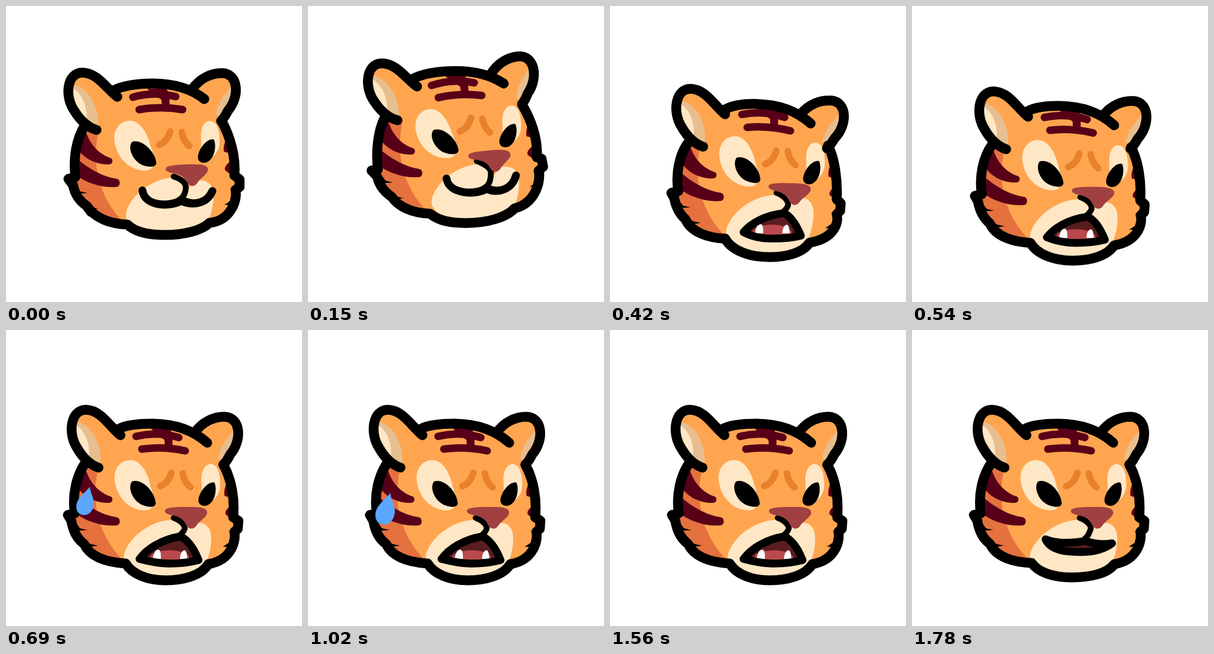
These frames come from a looping animation (512x512 px, 1.81 s). An HTML page without scripts:

```html
<!DOCTYPE html>
<html lang="en">
<head>
<meta charset="utf-8">
<title>Tiger</title>
<style>
html, body { margin: 0; width: 100%; height: 100%; overflow: hidden; background: #fff; }
svg { display: block; width: 100vw; height: 100vh; }

/* Poses: a = rest, p = wind-up, c = dropping, d = low, f = mouth shut; the drawing itself is the settled pose. */
.m { animation: pose 1810ms linear infinite; }
.morph { animation: morph 1810ms linear infinite; }
#head { animation: dip 1810ms linear infinite; }

@keyframes pose {
  0% { translate: var(--a); rotate: var(--ra, 0deg); animation-timing-function: ease-in-out; }
  10.77% { translate: var(--p); rotate: var(--rp, 0deg); animation-timing-function: cubic-bezier(.4,0,.75,.75); }
  16.57% { translate: var(--c); rotate: var(--rc, 0deg); animation-timing-function: cubic-bezier(.3,.4,.65,.9); }
  23.2% { translate: var(--d); rotate: var(--rd, 0deg); animation-timing-function: ease-in-out; }
  37.57%, 100% { translate: 0px 0px; rotate: 0deg; }
}
@keyframes morph {
  0% { d: var(--a); animation-timing-function: ease-in-out; }
  10.77% { d: var(--p); animation-timing-function: cubic-bezier(.4,0,.75,.75); }
  16.57% { d: var(--c); animation-timing-function: cubic-bezier(.3,.4,.65,.9); }
  23.2% { d: var(--d); animation-timing-function: ease-in-out; }
  37.57%, 93.37% { d: var(--e); }
  98.34%, 100% { d: var(--f); }
}
@keyframes dip {
  0%, 23.2% { translate: 0px 0px; animation-timing-function: ease-out; }
  25.97% { translate: 3px 9px; animation-timing-function: ease-in-out; }
  37.57%, 100% { translate: 0px 0px; }
}
@keyframes bite {
  0%, 10.77% { translate: 4px -62px; scale: 1 0; }
  16.57% { translate: 3px -40px; scale: 1 .25; }
  23.2% { translate: -3px -3px; scale: 1 1; }
  37.57%, 93.37% { translate: 0px 0px; scale: 1 1; }
  98.34%, 100% { translate: 3px -18px; scale: 1 0; }
}
@keyframes sweat {
  0%, 32.6% { transform: translate(6px,-16px) rotate(0deg) scale(0,0); animation-timing-function: ease-out; }
  38.12% { transform: translate(0px,0px) rotate(0deg) scale(1,1); }
  59.67% { transform: translate(-4px,16px) rotate(0deg) scale(1.13,1.13); }
  72.93% { transform: translate(1.5px,39px) rotate(-18deg) scale(.65,.78); }
  86.19%, 100% { transform: translate(4px,57px) rotate(-25deg) scale(0,0); }
}

.skin { fill: #ffa550; }
.cream { fill: #ffe7c5; }
.tan { fill: #e7be8f; }
.dark { fill: #580018; }
.line { fill: none; stroke: #000; stroke-width: 17; stroke-linecap: round; stroke-linejoin: round; }

.outline {
  --a: path("M186 146 C202 138 228 134 252 134 C288 134 318 141 343 161 M373 199 C387 224 398 260 395 293 L404 300 L404 313 L397 318 C401 336 388 372 352 375 C338 389 306 396 275 396 C245 396 222 390 210 378 C182 377 154 368 140 346 C128 338 119 326 116 310 L108 299 L120 296 C116 262 122 230 136 207");
  --p: path("M178 125 C198 114 228 110 256 110 C290 110 316 117 338 131 M370 167 C385 193 398 224 396 258 L404 260 L407 274 L399 281 C404 300 393 338 358 347 C345 362 313 373 273 373 C245 373 226 369 211 357 C187 356 161 350 145 328 C132 319 123 307 120 293 L110 283 L121 281 C117 247 122 212 132 192");
  --c: path("M186 154 C202 145 228 141 252 141 C288 141 318 148 341 167 M372 203 C386 226 397 262 395 300 L404 302 L404 316 L397 322 C400 340 388 374 352 380 C338 394 306 402 275 402 C245 402 222 396 210 382 C182 382 154 374 140 352 C128 344 119 334 116 318 L108 307 L120 304 C116 270 122 236 135 215");
  --d: path("M200 178 C212 172 228 169 248 169 C288 169 322 180 347 203 M377 241 C388 262 394 300 392 334 L399 341 L398 354 L392 360 C396 374 388 402 345 409 C334 426 306 434 276 434 C240 434 210 422 199 402 C172 401 140 392 130 368 C120 360 113 345 111 332 L106 323 L118 320 C113 290 120 255 136 235");
  --e: path("M195 171 C209 164 230 162 252 162 C290 162 322 172 348 195 M376 233 C390 258 396 292 393 324 L402 330 L401 344 L395 349 C398 362 392 398 350 405 C338 425 306 433 276 433 C244 433 218 422 207 404 C178 402 146 394 135 370 C124 362 116 348 113 330 L107 320 L119 317 C114 285 122 252 137 230");
  --f: path("M195 171 C209 164 230 162 252 162 C290 162 322 172 348 195 M376 233 C390 258 396 292 393 324 L402 330 L401 344 L395 349 C398 362 392 398 350 405 C338 422 306 428 276 428 C244 428 218 419 207 403 C178 402 146 394 135 370 C124 362 116 348 113 330 L107 320 L119 317 C114 285 122 252 137 230");
}
.mouth {
  --a: path("M236 319 C240 349 288 347 303 335 C325 347 348 341 357 320 C348 341 325 347 303 337 C288 347 240 349 236 319Z");
  --p: path("M240 296 C244 324 294 325 309 312 C330 323 354 314 360 290 C354 314 330 323 309 314 C294 325 244 324 240 296Z");
  --c: path("M237 352 C258 349 285 340 304 331 C316 337 333 346 346 350 C330 360 305 364 283 364 C262 364 246 360 237 352Z");
  --d: path("M231 391 C244 375 268 362 301 358 C314 364 323 380 330 397 C315 401 297 402 280 402 C262 402 244 398 231 391Z");
  --e: path("M231 396 C246 376 272 362 302 357 C316 364 326 380 333 398 C318 402 300 404 283 404 C264 404 246 400 231 396Z");
  --f: path("M231 362 C250 370 275 369 300 365 C312 369 330 372 346 369 C332 380 315 384 292 384 C268 384 240 382 231 362Z");
}
.philtrum {
  --a: path("M290 295 C303 299 311 306 311 313 C311 322 308 330 300 335");
  --p: path("M292 265 C304 270 317 276 317 286 C317 297 315 306 308 311");
  --c: path("M290 295 C303 299 311 306 312 314 C312 320 309 326 302 331");
  --d: path("M288 323 C299 327 308 334 308 344 C306 350 302 354 297 358");
  --e: path("M290 325 C301 329 310 336 309 344 C307 350 303 353 298 357");
  --f: path("M290 325 C301 329 310 336 309 344 C307 352 303 358 298 362");
}

#core { --a: -3px -28px; --p: -8px -50px; --c: -4px -22px; --d: 1px 5px; }
#earL { --a: -5px -23px; --p: -9px -41px; --c: -6px -15px; --d: 1px 5px;
  --ra: -2deg; --rp: -4deg; --rc: -3deg; transform-origin: 142px 190px; }
#earR { --a: -4px -34px; --p: -9px -65px; --c: -4px -27px; --d: 1px 12px;
  --rp: -6deg; --rd: 4deg; transform-origin: 362px 205px; }
#shade { --a: 1px -24px; --p: 5px -44px; --c: 2px -20px; --d: -3px 0px; }
#sideL { --a: 0px -25px; --p: 1px -44px; --c: 1px -21px; --d: 0px -1px; }
#sideR { --a: -1px -35px; --p: 0px -65px; --c: 0px -30px; --d: 0px 8px; }
#crown { --a: -5px -28px; --p: -11px -53px; --c: -5px -22.5px; --d: 2.5px 5px;
  --ra: -2.3deg; --rp: -5.5deg; --rc: -2.3deg; --rd: 2.3deg; transform-origin: 267px 197px; }
#brows { --a: -2px -30px; --p: -4.5px -56px; --c: -2px -27px; --d: 1.5px 3px; }
#eyeL { --a: 0px -27px; --p: -1px -50px; --c: 0px -23.5px; --d: 1px 0px;
  --ra: -2deg; --rp: -5deg; --rc: -2deg; transform-origin: 225px 270px; }
#eyeR { --a: -1px -33px; --p: -2px -63px; --c: -1px -30px; --d: 1px 4px; }
#muzzle { --a: 4px -32px; --p: 11px -58px; --c: 6px -30px; --d: -3px -2px; }
#nose { --a: 1.5px -32px; --p: 3px -59px; --c: 1.5px -32px; --d: -1px 0px;
  --ra: -1.5deg; --rp: -4.5deg; --rc: -1.5deg; --rd: 2deg; transform-origin: 312px 322px; }
#furL { --a: 0px -22.5px; --p: 7px -43px; --c: 1px -17px; --d: -2px 2px; }
#furR { --a: 3px -31px; --p: 9px -66px; --c: 3px -26px; --d: -3px 9px; }

#bite { transform-origin: 283px 397px; animation: bite 1810ms linear infinite; }
#drop { fill: #5ba6ff; transform-origin: 137px 296px; animation: sweat 1810ms linear infinite; }
</style>
</head>
<body>
<svg viewBox="0 0 512 512">
  <g id="head">
    <path class="skin outline morph"/>
    <path id="core" class="skin m" d="M200 171 L260 165 L320 173 L346 182 L378 217 V300 H140 V232Z"/>

    <path id="shade" class="m" fill="#e5713f" d="M137 234 L160 238 C148 285 152 350 207 403 C178 402 146 394 135 370 C124 362 116 348 119 317 C114 285 122 252 137 232Z"/>
    <g id="sideL" class="dark m">
      <path d="M137 238 C144 265 162 282 181 288 C186 290 185 299 178 299 C158 300 135 290 124 272Z"/>
      <path d="M124 290 C140 304 165 320 192 324 C199 326 198 338 191 338 C168 340 140 332 122 318Z"/>
    </g>
    <g id="sideR" class="dark m">
      <path d="M386 258 C380 266 376 278 378 287 L388 290Z"/>
      <path d="M388 304 C382 310 378 314 380 319 L390 327Z"/>
    </g>
    <g id="crown" class="m">
      <path class="dark" d="M250 170 L283 171 L288 180 V204 L275 202 L274 190 L265 184Z"/>
      <path d="M225 184 Q262 175 299 186 M235 206 Q272 201 310 209" fill="none" stroke="#580018" stroke-width="13" stroke-linecap="round"/>
    </g>
    <path id="brows" class="m" d="M286 247 Q281 265 267 270 M306 248 Q308 263 319 272" fill="none" stroke="#e9802a" stroke-width="11.5" stroke-linecap="round"/>

    <g id="eyeL" class="m">
      <path class="cream" d="M215 225 C195 225 184 245 189 266 C194 292 215 312 240 312 C262 312 256 285 250 270 C245 245 232 225 215 225Z"/>
      <path d="M218 262 C235 256 258 280 259 300 C258 308 245 307 234 302 C218 294 210 272 218 262Z"/>
    </g>
    <g id="eyeR" class="m">
      <path class="cream" d="M354 232 C368 232 372 255 370 275 C365 295 350 302 340 296 C336 288 340 275 338 260 C338 245 343 232 354 232Z"/>
      <path d="M361 265 C365 275 362 294 352 301 C344 307 334 304 333 296 C332 285 345 265 356 264 C359 263 361 264 361 265Z"/>
    </g>

    <path id="muzzle" class="cream m" d="M291 329 C262 326 218 350 205 385 C203 393 203 398 205 402 C218 422 244 431 276 431 C306 431 336 424 346 404 C356 380 357 355 352 345 C346 333 334 332 320 334 L312 348Z"/>
    <path class="mouth morph" fill="#5a1d1f"/>
    <g id="bite">
      <ellipse cx="283" cy="394" rx="34" ry="13" fill="#b9494c"/>
      <path fill="#fff" d="M254 396 C255 386 258 380 264 380 C268 381 268 389 268 396Z M301 396 C301 387 305 381 309 381 C313 382 313 390 314 396Z"/>
    </g>
    <path class="line mouth morph" style="stroke-width:13.5"/>
    <path class="line philtrum morph" style="stroke-width:10"/>
    <path id="nose" class="m" fill="#a04041" d="M275 312 C277 306 300 306 320 306 C340 306 349 309 348 317 C346 325 334 330 328 340 C322 346 316 344 312 338 C308 328 300 322 285 320 C278 318 274 316 275 312Z"/>

    <g id="earL" class="m">
      <path class="skin" d="M198 182 C180 168 165 139 139 138 C112 137 106 178 123 204 C133 222 147 234 160 238Z"/>
      <path class="tan" d="M118 158 C143 159 168 193 163 236 L130 222 L113 180Z"/>
      <path class="cream" d="M118 162 C136 172 147 196 143 224 L128 212 L114 182Z"/>
      <path class="line" d="M198 182 C180 168 165 139 139 138 C112 137 106 178 123 204 C133 222 147 234 160 238"/>
    </g>
    <g id="earR" class="m">
      <path class="skin" d="M326 178 C340 158 360 150 378 150 C406 151 409 190 388 215 C384 223 380 229 376 233Z"/>
      <path class="tan" d="M395 172 C382 186 370 202 367 222 L378 228 L396 200Z"/>
      <path class="cream" d="M394 184 C391 200 383 215 372 227 L382 226 L400 196Z"/>
      <path class="line" d="M326 178 C340 158 360 150 378 150 C406 151 409 190 388 215 C384 223 380 229 376 233"/>
    </g>

    <path id="furL" class="m" d="M114 324 L128 343 L141 346 L126 347 L134 362 L146 370 L159 373 L146 375 L160 388 L142 386 L118 354Z"/>
    <path id="furR" class="m" d="M400 330 L392 345 L385 349 L395 351 L388 366 L375 375 L384 375 L376 387 L391 382 L400 356Z"/>
    <path class="line outline morph"/>
  </g>
  <path id="drop" d="M145 271 C146 282 152 290 152 300 C151 313 144 320 135 320 C125 320 120 312 122 301 C125 288 137 282 145 271Z"/>
</svg>
</body>
</html>
```
